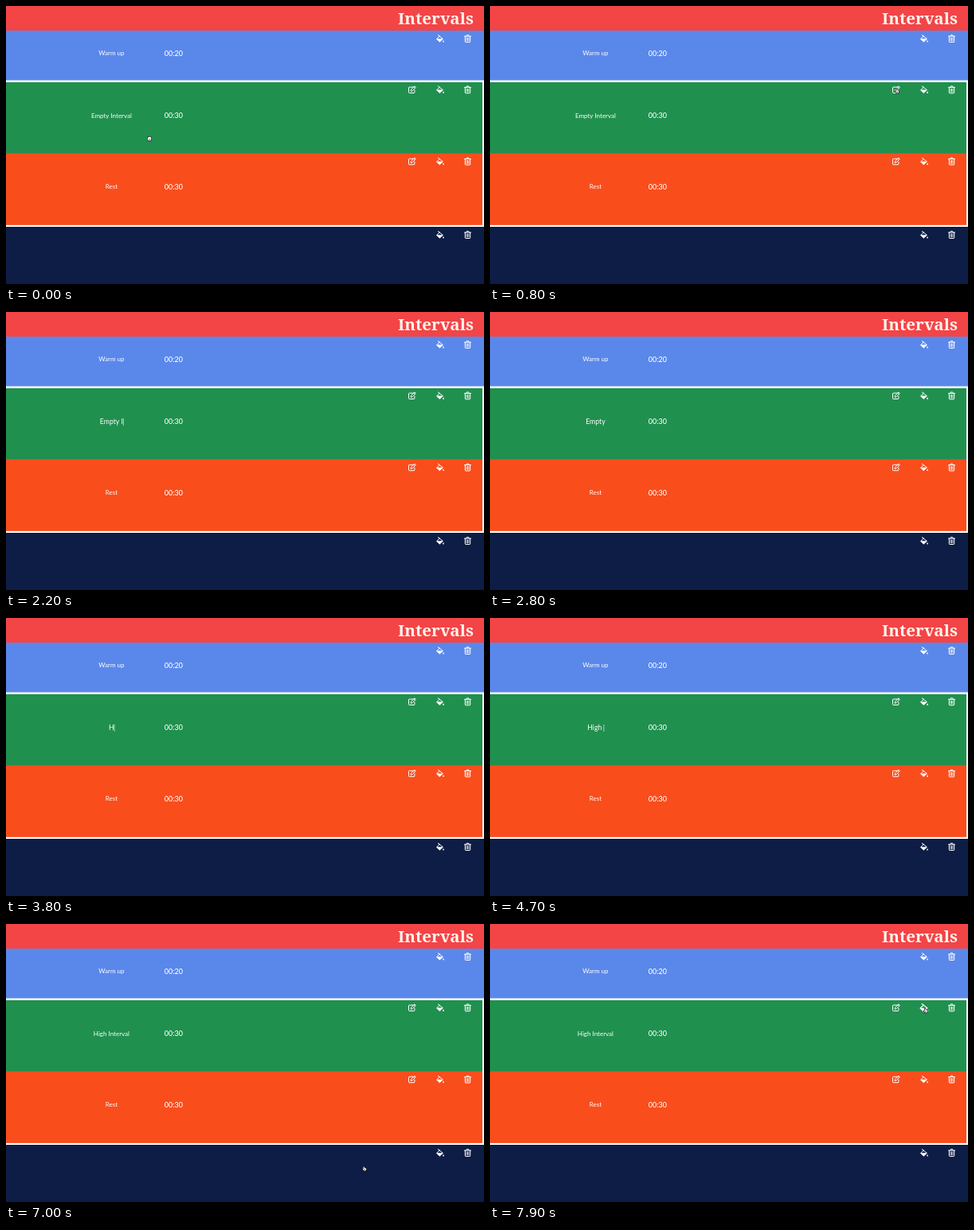
Recreate the animation shown at these times as an HTML page with a canvas. Size 600 px wide and 350 px high, loop 8000 ms.

```html
<!DOCTYPE html>
<html lang="en">
<head>
<meta charset="utf-8">
<title>Intervals</title>
<style>
html, body { margin: 0; width: 100%; height: 100%; overflow: hidden; background: #fff; }
canvas { display: block; width: 600px; height: 350px; }
</style>
</head>
<body>
<canvas id="stage"></canvas>
<script>
const W = 600, H = 350, LOOP = 8000;
const canvas = document.getElementById('stage');
const ctx = canvas.getContext('2d');
const dpr = window.devicePixelRatio || 1;
canvas.width = W * dpr;
canvas.height = H * dpr;

const GREEN = '#20904e', ORANGE = '#f94d1c', BLUE = '#5a88ea', NAVY = '#0d1d45', RED = '#f34446';
const SANS = 'Lato, "Open Sans", sans-serif';
const OLD_NAME = 'Empty Interval', NEW_NAME = 'High Interval';
const EDIT_START = 850, EDIT_END = 6750;

// Key times: held backspace, single backspaces, then typing.
const deletes = [];
for (let i = 0; i < 9; i++) deletes.push(1800 + i * 60);
for (let i = 0; i < 5; i++) deletes.push(2900 + i * 125);
const types = [3800, 3960, 4110, 4260, 4600, 4850, 5000, 5130, 5260, 5450, 5560, 5660, 5800];

// Pointer stops: time, x, y.
const path = [
  [0, 180, 167], [100, 180, 167], [700, 511, 107], [950, 511, 107],
  [1600, 304, 314], [6350, 304, 314], [6700, 450, 308], [7250, 450, 308], [7750, 547, 109], [8000, 547, 109]
];

function pointerAt(t) {
  let i = 1;
  while (i < path.length - 1 && path[i][0] <= t) i++;
  const [t0, x0, y0] = path[i - 1], [t1, x1, y1] = path[i];
  const p = Math.min(1, (t - t0) / (t1 - t0));
  const e = p * p * (3 - 2 * p);
  return { x: x0 + (x1 - x0) * e, y: y0 + (y1 - y0) * e };
}

function rect(color, x, y, w, h) {
  ctx.fillStyle = color;
  ctx.fillRect(x, y, w, h);
}

function text(str, x, y, font, align = 'center', color = '#fff') {
  ctx.font = font;
  ctx.textAlign = align;
  ctx.textBaseline = 'alphabetic';
  ctx.fillStyle = color;
  ctx.fillText(str, x, y);
}

const label = (str, y, size = 8) => text(str, 132.4, y, `${size}px ${SANS}`);
const clock = (str, y) => text(str, 210.4, y, `500 9px ${SANS}`);

function at(x, y, scale, draw) {
  ctx.save();
  ctx.translate(x, y);
  ctx.scale(scale, scale);
  ctx.strokeStyle = ctx.fillStyle = '#fff';
  ctx.lineWidth = 1;
  ctx.lineJoin = ctx.lineCap = 'round';
  draw();
  ctx.restore();
}

const line = d => ctx.stroke(new Path2D(d));
const fill = d => ctx.fill(new Path2D(d));

function editIcon() {
  line('M0.8 -3.2H-3.4Q-4.3 -3.2 -4.3 -2.3V3.3Q-4.3 4.2 -3.4 4.2H2.2Q3.1 4.2 3.1 3.3V0.7');
  line('M-1.6 1.7L-1.3 -0.2L3.1 -4.4L4.6 -2.9L0.3 1.4Z');
  line('M2.1 -3.4L3.6 -1.9');
}

function bucketIcon() {
  line('M-2.5 -4.4L3.6 0.4L-0.5 4.1L-4.3 0.6L-0.3 -3.1');
  fill('M-4.3 0.3H3.7L-0.5 4.3Z');
  fill('M4.2 1.9Q5.4 3.4 5.1 4.1Q4.2 5.1 3.4 4.1Q3.2 3.4 4.2 1.9Z');
}

function trashIcon() {
  line('M-4 -2.9H4M-1.7 -3.1L-1.2 -4.4H1.2L1.7 -3.1');
  line('M-3.2 -2.7V3.7Q-3.2 4.5 -2.4 4.5H2.4Q3.2 4.5 3.2 3.7V-2.7');
  ctx.lineWidth = 0.75;
  line('M-1.4 -1V2.8M0 -1V2.8M1.4 -1V2.8');
}

function icons(y, editable, hover) {
  if (editable) at(509.8, y, 1, editIcon);
  at(544.8, y, hover ? 1.12 : 1, bucketIcon);
  at(579.5, y, 1, trashIcon);
}

function hand(shape) {
  const p = new Path2D(shape);
  ctx.strokeStyle = '#111';
  ctx.lineWidth = 1.3;
  ctx.stroke(p);
  ctx.fillStyle = '#fff';
  ctx.fill(p);
  ctx.lineWidth = 0.4;
  line('M-0.4 0.4V1.8M0.8 0.4V1.8');
}

const GRAB = 'M-2.3 -0.2L-1.8 -1.8L-0.9 -2L0.2 -2.4L1.3 -2L2.3 -1.3L2.3 0.7L1.5 2.5H-1.2L-2.4 0.9Z';
const POINT = 'M-1.5 -2.6Q-0.8 -3 -0.5 -2.2L-0.2 -0.9L1.6 -0.6Q2.4 -0.3 2.3 0.6L1.8 2.5H-0.9L-2.4 0.6Q-2.4 0 -1.2 0.3Z';

function drawPointer(t) {
  if (t >= 1800 && t < 6350) return;
  const p = pointerAt(t);
  const overIcon = Math.abs(p.y - 105) < 8 && p.x > 503;
  const overRows = p.y > 96 && p.y < 276;
  at(p.x, p.y, 1, () => hand(overRows && !overIcon ? GRAB : POINT));
}

function drawName(t) {
  const editing = t >= EDIT_START && t < EDIT_END;
  const gone = deletes.filter(k => k <= t).length;
  const typed = types.filter(k => k <= t).length;
  const name = typed ? NEW_NAME.slice(0, typed) : OLD_NAME.slice(0, OLD_NAME.length - gone);
  label(name, 140.7, editing ? 8.7 : 8);
  if (!editing) return;
  const last = Math.max(EDIT_START, ...deletes.concat(types).filter(k => k <= t));
  if ((t - last) % 1000 < 500) {
    const x = 132.4 + ctx.measureText(name).width / 2;
    rect('rgba(255,255,255,.75)', x, 134, 0.8, 9);
  }
}

function draw(t) {
  ctx.setTransform(dpr, 0, 0, dpr, 0, 0);
  rect('#fff', 0, 0, W, H);
  rect(RED, 0, 0, W, 31);
  rect(BLUE, 0, 31, W, 62.5);
  rect(GREEN, 0, 96, 598, 90);
  rect(ORANGE, 0, 185.5, 598, 90.3);
  rect(NAVY, 0, 278, W, 72);
  text('Intervals', 587, 23, 'bold 20.6px "Noto Serif", serif', 'right', '#fff3ec');

  label('Warm up', 62.2);
  clock('00:20', 62.7);
  drawName(t);
  clock('00:30', 141.2);
  label('Rest', 230.2);
  clock('00:30', 230.7);

  icons(41, false);
  icons(105.3, true, t >= 7700);
  icons(195.5, true);
  icons(288, false);
  drawPointer(t);
}

const start = performance.now();
function frame() {
  draw((performance.now() - start) % LOOP);
  requestAnimationFrame(frame);
}
frame();
</script>
</body>
</html>
```
